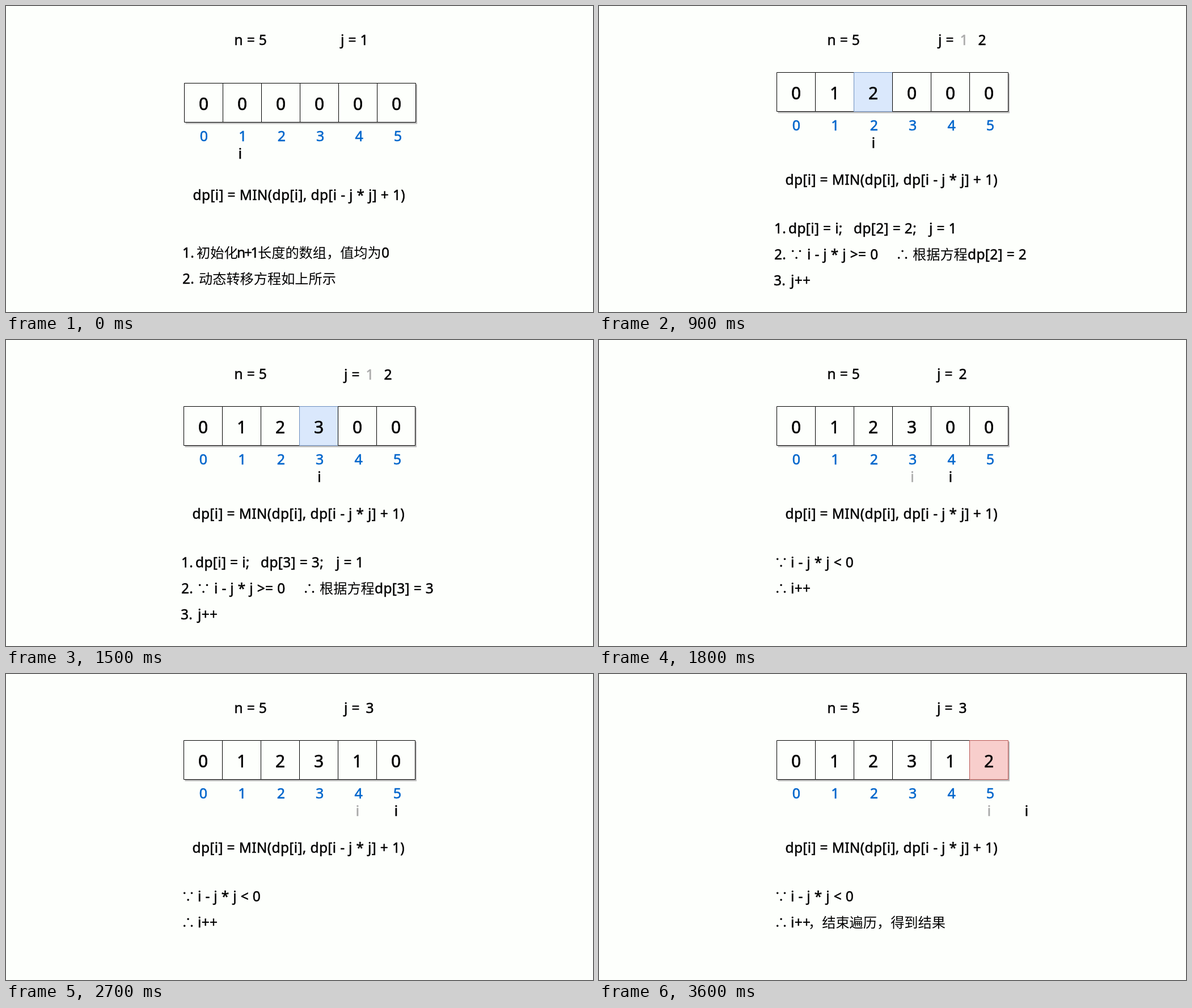
Write an HTML page with a canvas that moves like this. It is 1035 px wide and 541 px high and loops after 4.1 s.

```html
<!DOCTYPE html>
<html lang="zh-CN">
<head>
<meta charset="utf-8">
<title>DP array</title>
<style>
html, body { margin: 0; width: 100%; height: 100%; overflow: hidden; background: #fdfffc; }
canvas { display: block; }
</style>
</head>
<body>
<canvas id="stage" width="1035" height="541"></canvas>
<script>
const ctx = document.getElementById('stage').getContext('2d');
const BG = '#fdfffc', INK = '#000', GHOST = '#aaa', BLUE = '#0066cc';
const LATIN = '"Noto Sans", "Open Sans", sans-serif';
const CJK = '24.2px "Noto Sans CJK SC", "Noto Sans CJK", sans-serif';
const SIZE = 24.5, CELL = 68, STEP = 300, LOOP = 4100;
const POINTER_X = [348, 413, 484, 552.5, 620, 688, 754];
const ROWS = [402, 448, 494];
const TINT = {
  blue: ['#dae8fc', '#6c8ebf'],
  red: ['#f8cecc', '#b85450']
};

// Fills the text and adds a thin outline for a medium weight.
function ink(str, x, y, color, weight) {
  ctx.fillStyle = ctx.strokeStyle = color;
  ctx.lineWidth = weight;
  ctx.lineJoin = 'round';
  ctx.fillText(str, x, y);
  if (weight) ctx.strokeText(str, x, y);
}

function text(str, x, y) {
  const wide = /[^\x00-\x7f]/.test(str);
  ctx.font = wide ? CJK : SIZE + 'px ' + LATIN;
  ctx.letterSpacing = wide ? '0px' : '0.35px';
  ctx.textAlign = 'left';
  ink(str, x, y, INK, wide ? 0 : 0.5);
}

function centered(str, x, y, size = SIZE, color = INK) {
  ctx.font = size + 'px ' + LATIN;
  ctx.letterSpacing = '0px';
  ctx.textAlign = 'center';
  ink(str, x, y, color, 0.6);
}

// A row is a flat list: x, string, x, string, ...
function row(parts, y) {
  for (let k = 0; k < parts.length; k += 2) text(parts[k + 1], parts[k], y);
}

function drawArray(values, left, top, hot, tint) {
  ctx.fillStyle = '#bbb';
  ctx.fillRect(left + 2, top + 2, CELL * 6 + 0.5, 70);
  values.forEach((value, k) => {
    const x = left + k * CELL;
    const [fill, edge] = k === hot ? TINT[tint] : [BG, INK];
    ctx.fillStyle = fill;
    ctx.fillRect(x, top, CELL, 69);
    ctx.strokeStyle = edge;
    ctx.lineWidth = 1;
    ctx.strokeRect(x, top, CELL, 69);
  });
  values.forEach((value, k) => {
    centered(value, left + 34 + k * CELL, top + 47, 30);
    centered(k, left + 34.5 + k * 68.4, top + 102, 25, BLUE);
  });
}

// Rows shown when a value is first set with j = 1.
function assignRows(i) {
  const one = i === 1;
  return [
    [309, '1.', 334, 'dp[i] = i;', 449, `dp[${i}] = ${i};`, one ? 574 : 582, one ? 'j = 1;' : 'j = 1'],
    [309, '2.', 336, '∵', 367, 'i - j * j >= 0', 523, '∴', 553, '根据方程', 650, `dp[${i}] = ${i}`],
    [308, '3.', 338, 'j++']
  ];
}

function minRows(i, result) {
  const rows = [
    [309, '∵', 338, 'i - j * j >= 0'],
    [309, '∴', 339, `dp[${i}] = MIN(dp[${i}], dp[${i} - 2 * 2] + 1)`]
  ];
  if (result) rows.push([398, '= ' + result]);
  return rows;
}

const skipRows = tail => [
  [309, '∵', 338, 'i - j * j < 0'],
  [309, '∴', 338, 'i++', 369, tail]
];

const assign = (i, values, dx = 0, dy = 0) =>
  ({ i, values, hot: i, tint: 'blue', j: [1, 2], dx, dy, rows: assignRows(i) });
const minimise = (i, values, result) =>
  ({ i, values, hot: i, tint: 'blue', j: [2, 3], rows: minRows(i, result) });
const skip = (i, values, j, tail = '') =>
  ({ i: i + 1, ghost: i, values, j: [j], rows: skipRows(tail) });

const steps = [
  { intro: true, i: 1, values: '000000' },
  assign(1, '010000'),
  skip(1, '010000', 2),
  assign(2, '012000', 2),
  skip(2, '012000', 2),
  assign(3, '012300', 0, 1),
  skip(3, '012300', 2),
  assign(4, '012340', 0, 1),
  minimise(4, '012310', 1),
  skip(4, '012310', 3),
  assign(5, '012315'),
  minimise(5, '012312'),
  { ...skip(5, '012312', 3, '，结束遍历，得到结果'), hot: 5, tint: 'red' }
];

function drawCounter({ j, dx = 0, dy = 0 }) {
  const y = 68.5 + dy;
  text('j =', 596 + dx, y);
  centered(j[0], 641.5 + dx, y, SIZE, j.length > 1 ? GHOST : INK);
  if (j.length > 1) centered(j[1], 673.5 + dx, y);
}

function draw(step) {
  const { intro, i, ghost, values, hot, tint } = step;
  const left = intro ? 314.5 : 313.5, top = intro ? 136.5 : 117.5;
  ctx.fillStyle = BG;
  ctx.fillRect(0, 0, 1035, 541);
  text('n = 5', 402.5, 68.5);
  drawArray([...values], left, top, hot, tint);
  if (ghost) centered('i', POINTER_X[ghost], top + 133, SIZE, GHOST);
  centered('i', POINTER_X[i], top + 133);
  text('dp[i] = MIN(dp[i], dp[i - j * j] + 1)', left + 15, intro ? 342.5 : 316);
  if (intro) {
    text('j = 1', 590, 68.5);
    row([311, '1.', 336, '初始化', 407, 'n', 420, '+', 431.5, '1', 444, '长度的数组，值均为', 662, '0'], 445);
    row([311, '2.', 340, '动态转移方程如上所示'], 491);
  } else {
    drawCounter(step);
    step.rows.forEach((parts, k) => row(parts, ROWS[k]));
  }
}

const start = performance.now();
function tick() {
  const t = (performance.now() - start) % LOOP;
  draw(steps[Math.min(Math.floor(t / STEP), steps.length - 1)]);
  requestAnimationFrame(tick);
}
tick();
</script>
</body>
</html>
```
